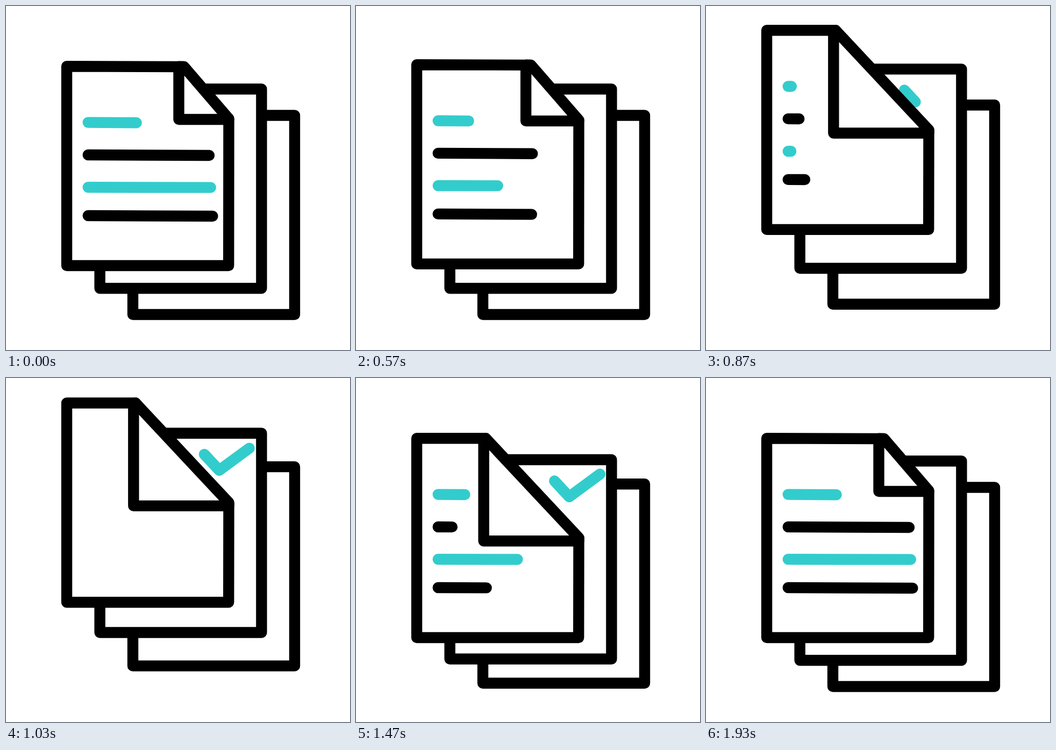
These frames come from a looping animation (640x640 px, 2.5 s). An HTML page:

```html
<!DOCTYPE html>
<html lang="en">
<head>
<meta charset="utf-8">
<title>Documents</title>
<style>
  html, body { margin: 0; width: 100%; height: 100%; overflow: hidden; background: #fff; }
  svg { display: block; width: 100%; height: 100%; }
  svg * { stroke-width: 20.4; stroke-linecap: round; stroke-linejoin: round; }
  .sheet { fill: #fff; stroke: #000; }
  .ink { fill: none; stroke: #000; }
  .teal { fill: none; stroke: #3cc; }
</style>
</head>
<body>
<svg viewBox="0 0 640 640">
  <g id="back">
    <path class="sheet" d="M236 203.5H537V574H236Z"/>
  </g>
  <g id="middle">
    <path class="sheet" d="M174.6 154.5H475.4V525.2H174.6Z"/>
    <path id="check" class="teal" pathLength="1" d="M369 193.7L396.7 223.5L454 181.3"/>
  </g>
  <g id="front">
    <path id="page" class="sheet"/>
    <path id="line1" class="teal" pathLength="1" d="M152.7 216.6L242.6 217.2"/>
    <path id="line2" class="ink" pathLength="1" d="M152.7 277L378 278"/>
    <path id="line3" class="teal" pathLength="1" d="M152.7 337.3L380.8 337.6"/>
    <path id="line4" class="ink" pathLength="1" d="M152.7 390L384.4 391"/>
    <path id="fold" class="sheet"/>
  </g>
</svg>
<script>
  const LOOP = 2500, STEP = 1000 / 30;
  const el = id => document.getElementById(id);

  // Eased progress from 0 to 1 between two times
  const ramp = (t, [from, to]) => {
    const p = Math.min(1, Math.max(0, (t - from) / (to - from)));
    return p * p * (3 - 2 * p);
  };
  const mix = (a, b, k) => a + (b - a) * k;

  const sheets = [
    { id: 'front', lift: 71, up: [515, 925], down: [950, 1450] },
    { id: 'middle', lift: 51.7, up: [600, 1010], down: [1033, 1533] },
    { id: 'back', lift: 39.5, up: [665, 1075], down: [1092, 1592] }
  ];
  const lines = [
    { id: 'line1', erase: [279, 979], write: [1267, 1640] },
    { id: 'line2', erase: [388, 976], write: [1342, 1930] },
    { id: 'line3', erase: [185, 935], write: [1267, 1600] },
    { id: 'line4', erase: [347, 1022], write: [1270, 1733] }
  ];

  // Show only the part of a stroke between two fractions of its length
  function trim(id, start, end) {
    const s = el(id).style;
    s.visibility = end - start > 0.0005 ? 'visible' : 'hidden';
    s.strokeDasharray = `${end - start} 9`;
    s.strokeDashoffset = -start;
  }

  function drawFold(k) {
    const x = mix(321.5, 237.3, k), y = mix(211, 303.6, k);
    const top = `${mix(331, 240.9, k)} ${mix(113, 112.3, k)}`;
    const side = `414.5 ${mix(210, 297.7, k)}`;
    el('page').setAttribute('d', `M113 112.3L${top}L${side}L414.2 483H113Z`);
    el('fold').setAttribute('d', `M${x} 112.8V${y}H414.5L${side}L${top}Z`);
  }

  function draw(t) {
    for (const { id, lift, up, down } of sheets) {
      const y = lift * (ramp(t, down) - ramp(t, up));
      el(id).setAttribute('transform', `translate(0 ${y})`);
    }
    for (const { id, erase, write } of lines) {
      trim(id, 0, 1 - ramp(t, erase) + ramp(t, write));
    }
    trim('check', ramp(t, [1450, 1930]), ramp(t, [770, 1054]));
    drawFold(ramp(t, [517, 839]) - ramp(t, [1450, 1930]));
  }

  // The motion runs at 30 steps per second
  function tick() {
    const t = performance.now() % LOOP;
    draw(Math.floor((t + 5) / STEP) * STEP);
    requestAnimationFrame(tick);
  }
  tick();
</script>
</body>
</html>
```
